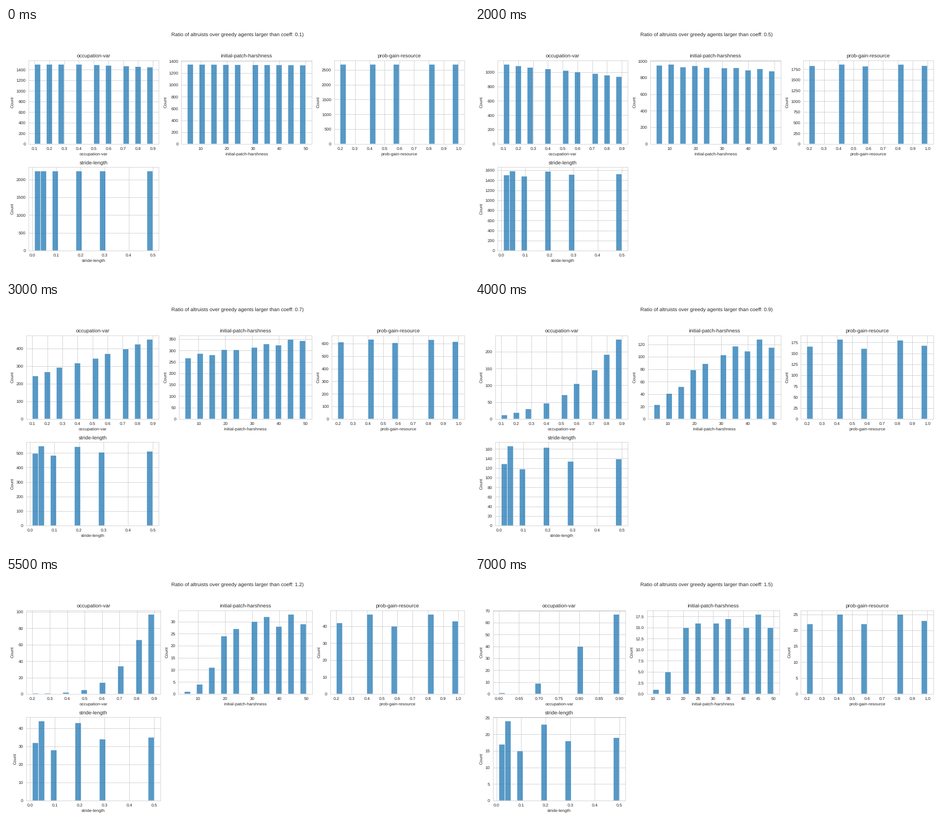
Animation of 1025x547 px, one loop 7.5 s. Source, as a matplotlib script:

```python
import numpy as np
import matplotlib.pyplot as plt
from matplotlib.animation import FuncAnimation

WIDTH, HEIGHT = 1025, 547
DPI = WIDTH / 15
FRAMES = 15
RUNS = 13500

plt.rcParams.update({
    "font.family": "Liberation Sans",
    "text.hinting": "none",
    "text.color": ".15",
    "axes.labelcolor": ".15",
    "axes.edgecolor": ".8",
    "axes.linewidth": 1,
    "axes.grid": True,
    "axes.axisbelow": True,
    "grid.color": ".8",
    "grid.linewidth": 1,
    "xtick.color": ".15",
    "ytick.color": ".15",
    "xtick.bottom": False,
    "ytick.left": False,
})

# Key coefficients for the steepness of each panel and for the unevenness.
KEYS = [0.2, 0.5, 0.7, 1.0, 1.2, 1.3, 1.5]
UNEVENNESS = [0, 0.035, 0.065, 0.235, 0.235, 0.235, 0.235]
FLAT = [0] * len(KEYS)

# Name, values, index of the logistic midpoint, steepness, share of unevenness.
PANELS = [
    ("occupation-var", np.arange(1, 10) / 10, 6.9,
     [-0.015, -0.045, 0.13, 0.68, 1.1, 1.7, 2.2], 0),
    ("initial-patch-harshness", np.arange(5, 51, 5), 2.3,
     [-0.002, -0.016, 0.06, 0.9, 1.5, 2.3, 2.3], 0.4),
    ("prob-gain-resource", np.arange(2, 11, 2) / 10, 0, FLAT, 0.35),
    ("stride-length", np.array([0.01, 0.05, 0.1, 0.2, 0.3, 0.5]), 0, FLAT, 1),
]


def total_runs(coeff):
    """Runs above the coefficient: a steep fall, then a slow tail."""
    body = 13420 / (1 + (coeff / 0.571) ** 5.9)
    tail = 218 * np.exp(-2.1 * (coeff - 1.2))
    return max(body, tail)


def run_counts(coeff, size, midpoint, steepness, unevenness):
    """Logistic share of the runs for each value, with a fixed wobble."""
    index = np.arange(size)
    slope = np.interp(coeff, KEYS, steepness)
    weights = 1 / (1 + np.exp(-slope * (index - midpoint)))
    wobble = unevenness * np.interp(coeff, KEYS, UNEVENNESS)
    counts = total_runs(coeff) * weights / weights.sum()
    counts *= 1 + wobble * np.sin(2.6 * index - 0.6)
    return np.ceil(np.minimum(counts, RUNS / size) - 0.16)


def draw_histogram(ax, name, values, counts):
    present = counts > 0
    heights, edges = np.histogram(values[present], bins=20,
                                  weights=counts[present])
    ax.bar(edges[:-1], heights, np.diff(edges), align="edge",
           facecolor=(31 / 255, 119 / 255, 180 / 255, 0.75),
           edgecolor="white", linewidth=1, snap=False)
    ax.set(title=name, xlabel=name, ylabel="Count")


def update(step):
    fig.clear()
    coeff = (step + 1) / 10
    fig.suptitle("Ratio of altruists over greedy agents "
                 f"larger than coeff: {coeff})")
    for i, (name, values, *shape) in enumerate(PANELS):
        counts = run_counts(coeff, len(values), *shape)
        draw_histogram(fig.add_subplot(2, 3, i + 1), name, values, counts)
    fig.tight_layout(rect=(0, 0.03, 1, 0.95))


# The tiny excess keeps rounding from dropping a pixel.
fig = plt.figure(figsize=((WIDTH + 1e-6) / DPI, (HEIGHT + 1e-6) / DPI), dpi=DPI)
animation = FuncAnimation(fig, update, frames=FRAMES, interval=500,
                          repeat=True, repeat_delay=0)
plt.show()
```
